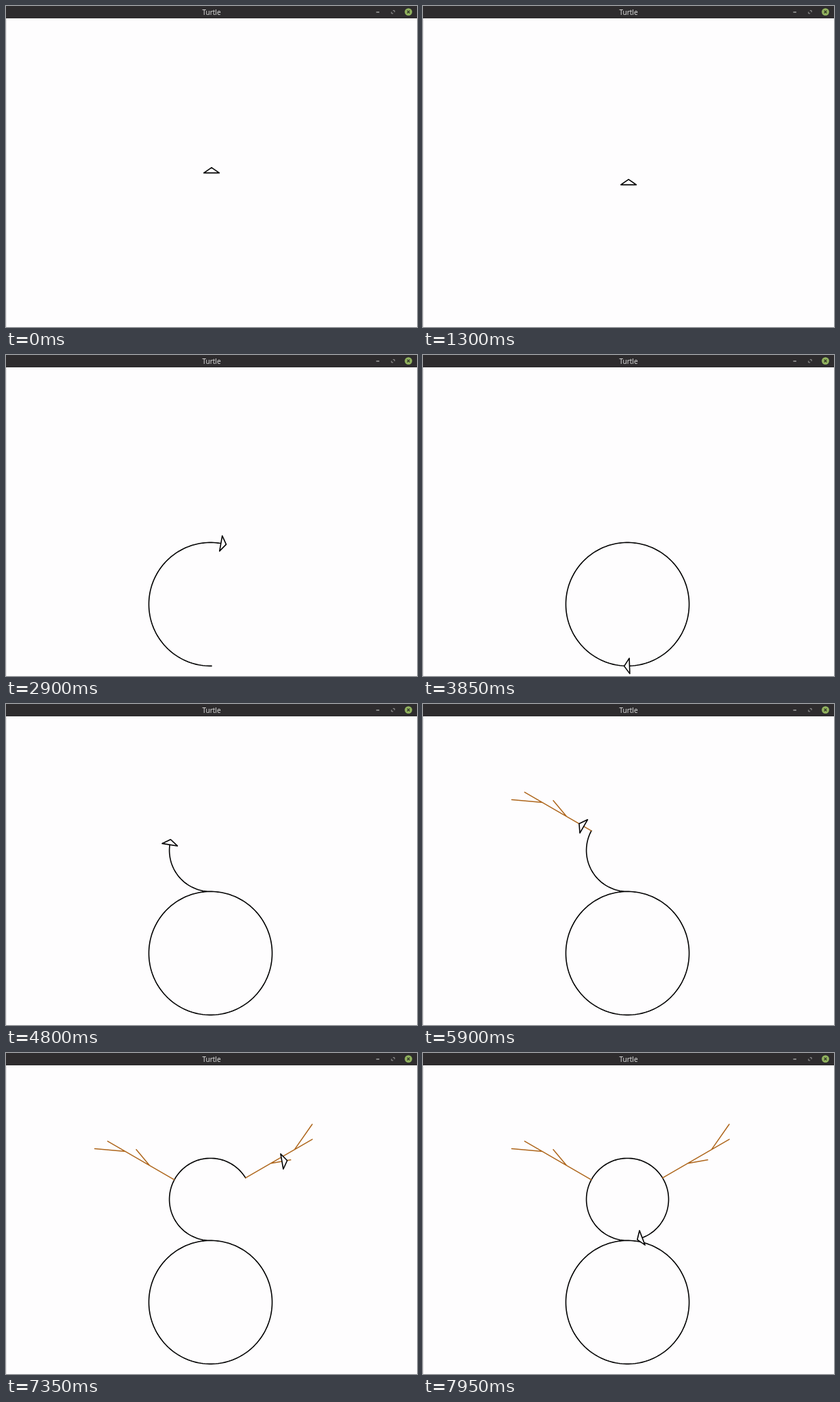
An HTML page that plays this animation: 600x468 px, repeating every 8000 ms.

```html
<!DOCTYPE html>
<html lang="en">
<head>
<meta charset="utf-8">
<title>Turtle</title>
<style>
  html, body { margin: 0; width: 100%; height: 100%; overflow: hidden; background: #fefdfe; }
  svg { display: block; width: 100%; height: 100%; }
  .pen { fill: none; stroke-linejoin: round; stroke-linecap: round; }
</style>
</head>
<body>
<svg viewBox="0 0 600 468">
  <rect width="600" height="468" fill="#fefdfe"/>
  <rect y="18" width="0.6" height="450" fill="#d4d3d4"/>
  <rect width="600" height="18" fill="#2e2c2e"/>
  <text x="300" y="12.8" text-anchor="middle" font-family="'Noto Sans', 'Open Sans', sans-serif" font-size="10" font-weight="500" fill="#dedede">Turtle</text>
  <path d="M540.5 9h4.5" stroke="#bdbdbd" stroke-width="1.2"/>
  <path d="M564.8 6.7h2.4v2.4M565.2 10.9h-2.4v-2.4" fill="none" stroke="#a8a8a8" stroke-width="0.9"/>
  <circle cx="587.5" cy="8.6" r="5.4" fill="#92b35f"/>
  <path d="M585.6 6.7l3.8 3.8m0-3.8l-3.8 3.8" stroke="#2b2f22" stroke-width="1.2"/>
  <path id="ink" class="pen" stroke="#000" stroke-width="1.6"/>
  <path id="wood" class="pen" stroke="#ae661c" stroke-width="1.5"/>
  <path id="turtle" fill="#fefdfe" stroke="#000" stroke-width="1.6" stroke-linejoin="round"/>
</svg>
<script>
const LOOP = 8000, MS_PER_PX = 2.8, MS_PER_TURN = 4;
const el = id => document.getElementById(id);
const vec = deg => [Math.sin(deg * Math.PI / 180), -Math.cos(deg * Math.PI / 180)];

const fd = d => ({ d, a: 0 });
const bk = d => fd(-d);
const rt = a => ({ d: 0, a });
const lt = a => rt(-a);
const cost = op => op.d ? Math.abs(op.d) * MS_PER_PX : MS_PER_TURN;

// n sides of a circle, each turning by a degrees
const arc = (n, a) => Array.from({ length: n }, () => [fd(Math.PI), rt(a)]).flat();

const branch = [
  lt(90), fd(112.5), bk(30),
  lt(25), fd(45), bk(45), rt(25), bk(40.5),
  rt(20), fd(30), bk(30), lt(20), bk(42), rt(90)
];

// [start, end, pen, commands]
const script = [
  [1255, 1820, null, [bk(210), lt(90)]],
  [1820, 2099, "ink", arc(22, 2)],
  [2099, 2953, "ink", arc(78, 2)],
  [2953, 3858, "ink", arc(80, 2)],
  [3858, 4370, null, [rt(90), fd(180), lt(90)]],
  [4370, 4891, "ink", arc(40, 3)],
  [4891, 5940, "wood", branch],
  [5940, 6452, "ink", arc(40, 3)],
  [6452, 7524, "wood", branch],
  [7524, 7998, "ink", arc(37, 3)]
];

// Resolve the commands into timed moves
const start = { x: 300.1, y: 243.4, h: 0 };
const moves = [];
let pos = start;
for (const [t0, t1, pen, ops] of script) {
  const scale = (t1 - t0) / ops.reduce((sum, op) => sum + cost(op), 0);
  let t = t0;
  for (const op of ops) {
    const [dx, dy] = vec(pos.h);
    const to = { x: pos.x + dx * op.d, y: pos.y + dy * op.d, h: pos.h + op.a };
    const dur = cost(op) * scale;
    moves.push({ t, dur, pen, from: pos, to });
    t += dur;
    pos = to;
  }
}

const mix = (a, b, k) => a + (b - a) * k;
const pt = (x, y) => x.toFixed(2) + " " + y.toFixed(2);

function arrow({ x, y, h }) {
  const [fx, fy] = vec(h), wing = 11.3, tip = 7.8;
  return "M" + pt(x + fx * tip, y + fy * tip) +
    "L" + pt(x - fy * wing, y + fx * wing) +
    "L" + pt(x + fy * wing, y - fx * wing) + "Z";
}

function draw(time) {
  const lines = { ink: "", wood: "" };
  let now = start, last = null;
  for (const { t, dur, pen, from, to } of moves) {
    if (time <= t) break;
    const k = Math.min(1, (time - t) / dur);
    now = { x: mix(from.x, to.x, k), y: mix(from.y, to.y, k), h: mix(from.h, to.h, k) };
    if (pen) {
      if (pen !== last) lines[pen] += "M" + pt(from.x, from.y);
      lines[pen] += "L" + pt(now.x, now.y);
    }
    last = pen;
  }
  el("ink").setAttribute("d", lines.ink);
  el("wood").setAttribute("d", lines.wood);
  el("turtle").setAttribute("d", arrow(now));
}

const begin = performance.now();
function tick() {
  draw((performance.now() - begin) % LOOP);
  requestAnimationFrame(tick);
}
tick();
</script>
</body>
</html>
```
